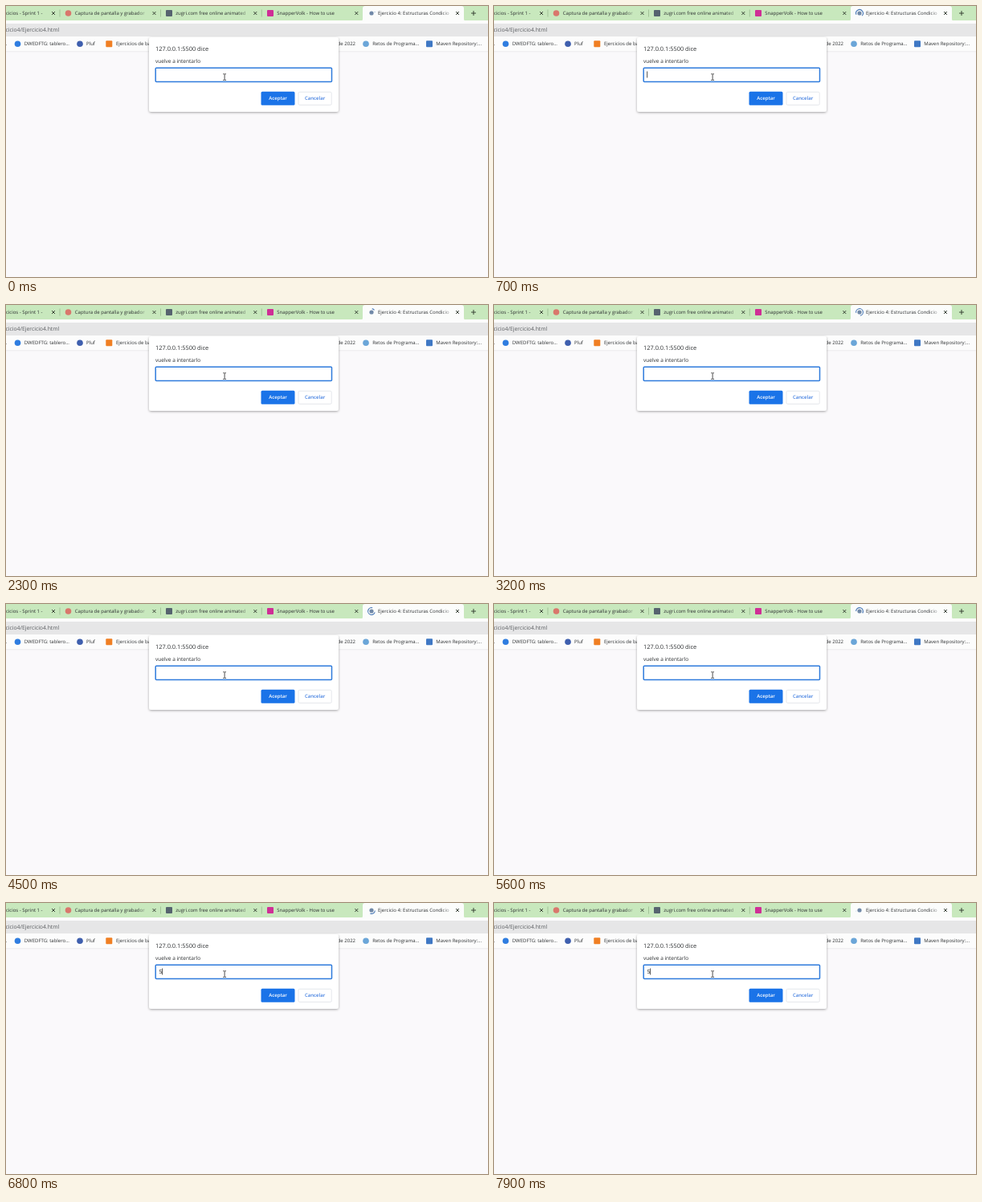
Recreate the animation shown at these times as an HTML page. Size 600 px wide and 338 px high, loop 8 s.

```html
<!DOCTYPE html>
<html lang="es">
<head>
<meta charset="utf-8">
<title>Ejercicio 4</title>
<style>
  html, body { margin: 0; width: 100%; height: 100%; overflow: hidden; background: #faf9fb; }
  svg { display: block; width: 100vw; height: 100vh; }
  text {
    font: 6px "Open Sans", "Noto Sans", sans-serif;
    fill: #2b2e30; white-space: pre; text-rendering: geometricPrecision;
  }
  .url { font-size: 6.8px; fill: #5a5d60; }
  .heading { font-size: 7.4px; }
  .message { font-size: 6.5px; }
  .entry { font-size: 6.8px; fill: #111; }
  .button { font-weight: 600; text-anchor: middle; }
  .line { fill: none; stroke: #2c352a; stroke-width: .9; }
</style>
</head>
<body>
<svg viewBox="0 0 600 338">
  <defs>
    <linearGradient id="fade">
      <stop offset="0" stop-color="#c8e8bd" stop-opacity="0"/>
      <stop offset="1" stop-color="#c8e8bd"/>
    </linearGradient>
    <linearGradient id="activeFade">
      <stop offset="0" stop-color="#fbfcfb" stop-opacity="0"/>
      <stop offset="1" stop-color="#fbfcfb"/>
    </linearGradient>
    <filter id="shadow" x="-10%" y="-10%" width="120%" height="130%">
      <feDropShadow dx="0" dy="1" stdDeviation="1.4" flood-color="#000" flood-opacity=".35"/>
    </filter>
  </defs>

  <rect width="600" height="338" fill="#faf9fb"/>
  <rect width="600" height="19" fill="#c8e8bd"/>
  <path d="M441 19q3 0 3-3V3q0-3 3-3H567q3 0 3 3V16q0 3 3 3Z" fill="#fbfcfb"/>
  <rect y="18" width="600" height="39" fill="#fcfcfc"/>
  <rect y="22" width="600" height="16" fill="#e6e6e7"/>
  <rect y="56.5" width="600" height=".8" fill="#e6e6e8"/>
  <text class="url" x="-.4" y="31.7">cicio4/Ejercicio4.html</text>

  <g id="tabs"></g>
  <path class="line" d="M579 9h6M582 6v6"/>
  <circle cx="455" cy="9" r="2.6" fill="#7189a8"/>
  <path id="spinner" fill="none" stroke="#4777b6" stroke-width="1.1"/>
  <g id="bookmarks"></g>

  <g id="dialog">
    <rect x="178" y="39" width="236" height="93" rx="3" fill="#fff" filter="url(#shadow)"/>
    <text class="heading" x="186" y="55.6">127.0.0.1:5500 dice</text>
    <text class="message" x="186" y="70.7">vuelve a intentarlo</text>
    <rect x="186.2" y="77.2" width="219.3" height="17.2" rx="1" fill="#fff" stroke="#2f7bdc" stroke-width="1.5"/>
    <text id="entry" class="entry" x="190.5" y="88.2"></text>
    <path id="caret" stroke="#222" stroke-width=".8"/>
    <rect x="317.5" y="106.8" width="42" height="17" rx="1.6" fill="#1a73e8"/>
    <text class="button" x="338.6" y="117.4" style="fill:#fff">Aceptar</text>
    <rect x="364" y="107.3" width="41.2" height="16.2" rx="1.6" fill="#fff" stroke="#dfe2e7" stroke-width=".8"/>
    <text class="button" x="384.6" y="117.4" style="fill:#3f7de0">Cancelar</text>
  </g>
  <path d="M270.2 84.8h1.3l.6.5.6-.5H274M270.2 92.4h1.3l.6-.5.6.5H274M272.1 85.3v6.6" fill="none" stroke="#222" stroke-width=".8"/>
</svg>
<script>
  const LOOP = 8000;
  const byId = id => document.getElementById(id);

  const label = (x, y, text, anchor = "start") =>
    `<text x="${x}" y="${y}" text-anchor="${anchor}">${text}</text>`;
  const dot = (x, y, color) => `<circle cx="${x}" cy="${y}" r="3.8" fill="${color}"/>`;
  const tile = (x, y, color) =>
    `<rect x="${x - 4}" y="${y - 4}" width="8" height="8" rx="1" fill="${color}"/>`;
  const cross = x => `<path class="line" d="M${x - 2} 7l4 4m0-4l-4 4"/>`;
  const divider = x => `<path d="M${x} 4.5v9" stroke="#93b389" stroke-width=".7"/>`;
  const fade = (x, id = "fade") =>
    `<rect x="${x}" y="3" width="16" height="13" fill="url(#${id})"/>`;

  byId("tabs").innerHTML = [
    label(0, 11.2, "cicios - Sprint 1 -"), cross(59), divider(67),
    dot(77.5, 9, "#d9776c"), label(85.8, 11.2, "Captura de pantalla y grabador"),
    fade(163), cross(184.5), divider(192.5),
    tile(203, 9, "#56636f"), label(211.3, 11.2, "zugri.com free online animated"),
    fade(289), cross(310.3), divider(318.3),
    tile(329, 9, "#cf2f96"), label(337.3, 11.2, "SnapperVolk - How to use"), cross(436.3),
    label(463, 11.2, "Ejercicio 4: Estructuras Condicio"), fade(542, "activeFade"), cross(562)
  ].join("");

  byId("bookmarks").innerHTML = [
    label(-.4, 49.4, "."),
    dot(14.5, 47.2, "#2f7de0"), label(22.8, 49.4, "DWEDFTG: tablero..."),
    dot(92, 47.2, "#3f5fae"), label(100, 49.4, "Pluf"),
    tile(128.3, 47.2, "#f07f23"), label(137, 49.4, "Ejercicios de bases"),
    label(435, 49.4, "de 2022", "end"),
    dot(448, 47.2, "#6ba6d8"), label(456.3, 49.4, "Retos de Programa..."),
    tile(527, 47.2, "#3f78c4"), label(535.3, 49.4, "Maven Repository:...")
  ].join("");

  // Standard easing cubic-bezier(.4, 0, .2, 1), solved by bisection.
  function ease(p) {
    let lo = 0, hi = 1;
    for (let i = 0; i < 20; i++) {
      const s = (lo + hi) / 2, r = 1 - s;
      if (1.2 * r * r * s + .6 * r * s * s + s ** 3 < p) lo = s; else hi = s;
    }
    return 3 * (1 - lo) * lo * lo + lo ** 3;
  }

  const SWEEP = 270, ARC_TIME = 2000 / 3, TURN_TIME = 1568;

  // The arc shrinks into its start angle, then grows out of it again.
  function spinnerPath(time) {
    const elapsed = time + 70 + ARC_TIME;
    const phase = Math.floor(elapsed / ARC_TIME);
    const size = SWEEP * ease(elapsed % ARC_TIME / ARC_TIME);
    const sweep = phase % 2 ? Math.max(size, 5) : Math.min(size - SWEEP, -5);
    const start = 65 + 360 * time / TURN_TIME + SWEEP * Math.floor(phase / 2);
    const point = degrees => {
      const a = degrees * Math.PI / 180;
      return `${455 + 4.4 * Math.sin(a)} ${9 - 4.4 * Math.cos(a)}`;
    };
    const large = Math.abs(sweep) > 180 ? 1 : 0;
    return `M${point(start)}A4.4 4.4 0 ${large} ${sweep > 0 ? 1 : 0} ${point(start + sweep)}`;
  }

  const BLINK = 530, FIRST_BLINK = 370, KEY_PRESS = 6600;

  function render(time) {
    const typed = time >= KEY_PRESS;
    const sinceBlink = time - (typed ? KEY_PRESS : FIRST_BLINK);
    const caretOn = sinceBlink >= 0 && Math.floor(sinceBlink / BLINK) % 2 === 0;
    byId("entry").textContent = typed ? "5" : "";
    byId("caret").setAttribute("d", caretOn ? `M${typed ? 194.6 : 190.7} 81.5v8` : "");
    byId("spinner").setAttribute("d", spinnerPath(time));
  }

  const begin = performance.now();
  function tick() {
    render((performance.now() - begin) % LOOP);
    requestAnimationFrame(tick);
  }
  tick();
</script>
</body>
</html>
```
